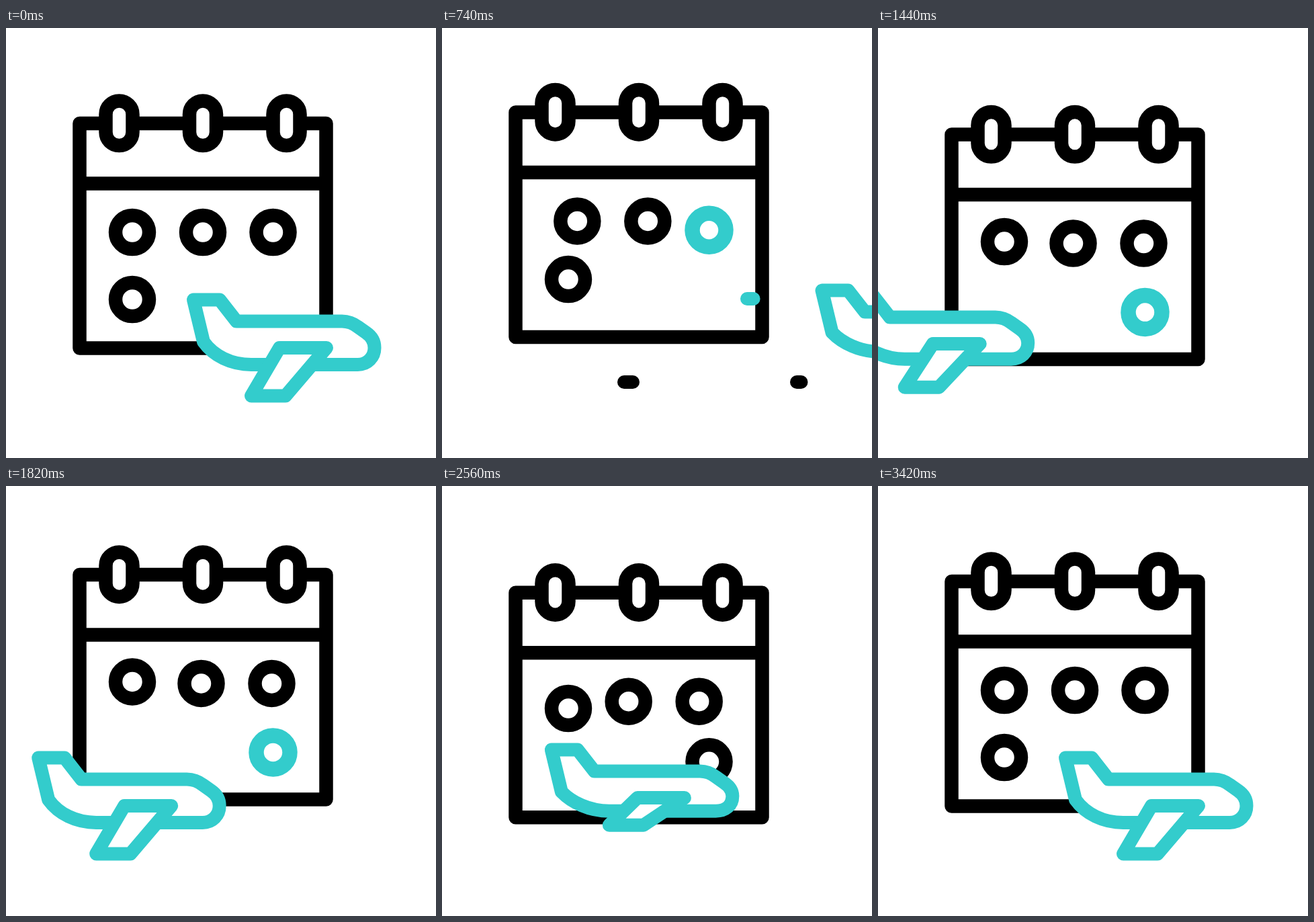
Animation of 640 by 640 pixels, one loop 3.62 s. Source, as an HTML page with a canvas:

```html
<!DOCTYPE html>
<html lang="en">
<head>
<meta charset="utf-8">
<title>Calendar and plane</title>
<style>
html, body { margin: 0; width: 100%; height: 100%; overflow: hidden; background: #fff; }
canvas { display: block; width: 640px; height: 640px; }
</style>
</head>
<body>
<canvas id="stage" width="640" height="640"></canvas>
<script>
const ctx = document.getElementById('stage').getContext('2d');
const LOOP = 3620, BLACK = '#000', TEAL = '#33cccc';

const progress = (t, from, to) => Math.min(1, Math.max(0, (t - from) / (to - from)));
const ease = p => (1 - Math.cos(Math.PI * p)) / 2;

// Eased value along [time, value] keys
function keyed(t, keys) {
  let value = keys[0][1];
  for (let i = 1; i < keys.length; i++) {
    const [t0, v0] = keys[i - 1], [t1, v1] = keys[i];
    if (t >= t0) value = v0 + (v1 - v0) * ease(progress(t, t0, t1));
  }
  return value;
}

// Smooth curve through [time, value] keys, at rest at both ends
function spline(t, keys) {
  const last = keys.length - 1;
  if (t >= keys[last][0]) return keys[last][1];
  const slope = i => i === 0 || i === last ? 0 :
    (keys[i + 1][1] - keys[i - 1][1]) / (keys[i + 1][0] - keys[i - 1][0]);
  const i = keys.findIndex(k => k[0] > t) - 1;
  const [t0, v0] = keys[i], [t1, v1] = keys[i + 1];
  const d = t1 - t0, p = (t - t0) / d, q = 1 - p;
  return q * q * (1 + 2 * p) * v0 + p * p * (1 + 2 * q) * v1 +
    d * p * q * (q * slope(i) - p * slope(i + 1));
}

function paint(path, color, fill, width = 20) {
  ctx.strokeStyle = color;
  ctx.lineWidth = width;
  if (fill) {
    ctx.fillStyle = '#fff';
    ctx.fill(path);
  }
  ctx.stroke(path);
}

function drawCalendar() {
  const frame = new Path2D('M109.5 142H476.5V476.5H109.5ZM109.5 231.5H476.5');
  paint(frame, BLACK, true, 20.5);
  for (const x of [168.5, 293, 417.5]) {
    const clip = new Path2D();
    clip.roundRect(x - 20, 108.5, 40, 66.5, 20);
    paint(clip, BLACK, true, 20.5);
  }
}

function drawDays(t) {
  const move = keyed(t, [[600, 0], [1200, 102.5], [2400, 102.5], [3100, 0]]);
  const ring = (x, y) => {
    const path = new Path2D();
    path.arc(x, y, 25, 0, 2 * Math.PI);
    paint(path, BLACK, false, 20.5);
  };
  ring(188, 404 - move);
  ring(188 + move, 304);
  ring(293 + move, 304);
  ring(397.5, 304 + move);

  const sweep = progress(t, 400, 600) - progress(t, 2200, 2400);
  if (sweep > 0) {
    const mark = new Path2D(), start = -0.8;
    mark.arc(397.5, 304 + move, 25, start, start - sweep * 2 * Math.PI, true);
    paint(mark, TEAL, false, 22.5);
  }
}

function drawDashes(t) {
  const u = progress(t, 320, 780);
  if (u <= 0 || u >= 1) return;
  const head = Math.min(1, u / 0.6), tail = Math.max(0, (u - 0.4) / 0.6);
  for (const [x, length, y, color] of [
    [363, 92, 527, BLACK], [574, 46, 527, BLACK], [522, 68, 403, TEAL]
  ]) {
    paint(new Path2D(`M${x - length * tail} ${y}H${x - length * head}`), color);
  }
}

// Horizontal shift plus the lift of upper body, belly and wing tip
function planePose(t) {
  if (t < 800) {
    const p = progress(t, 200, 800), go = p ** 2.6, rise = p ** 4;
    return [375 * go, -21 * rise, -29 * rise, -45 * go];
  }
  if (t < 1800) {
    const left = 1 - ease(progress(t, 800, 1800));
    return [-231 - 330 * left, -21 * left, -29 * left, -45 * left];
  }
  const lift = keyed(t, [[1800, 0], [2600, 1], [3400, 0]]);
  const x = spline(t, [[1800, -231], [2260, -174], [2860, -60], [3400, 0]]);
  return [x, -12 * lift, -17.4 * lift, -43 * lift];
}

function drawPlane(t) {
  const [x, top, belly, tip] = planePose(t);
  const low = 501 + belly, nose = 476 + (top + belly) / 2;
  ctx.save();
  ctx.translate(x, 0);
  paint(new Path2D(`M279 ${404.5 + top}H318L343 ${436.5 + top}H500
    Q513 ${436.5 + top} 524 ${445 + top}L536 ${453.5 + top}
    Q548.5 ${462 + top} 548.5 ${nose}
    C548.5 ${nose + 14} 538 ${low} 523.5 ${low}H365
    C335 ${low} 309 ${488 + belly} 294 ${467 + top}Z`), TEAL, true);
  paint(new Path2D(`M407 ${476 + top}H477L416 ${547.5 + tip}H365Z`), TEAL, true);
  ctx.restore();
}

function draw(now) {
  const t = now % LOOP;
  ctx.clearRect(0, 0, 640, 640);
  ctx.lineCap = ctx.lineJoin = 'round';
  ctx.save();
  ctx.translate(0, keyed(t, [[200, 0], [800, -17], [1400, 17], [2000, -17], [2600, 17], [3200, 0]]));
  drawCalendar();
  drawDays(t);
  ctx.restore();
  drawDashes(t);
  drawPlane(t);
}

const begin = performance.now();
function tick() {
  draw(performance.now() - begin);
  requestAnimationFrame(tick);
}
tick();
</script>
</body>
</html>
```
